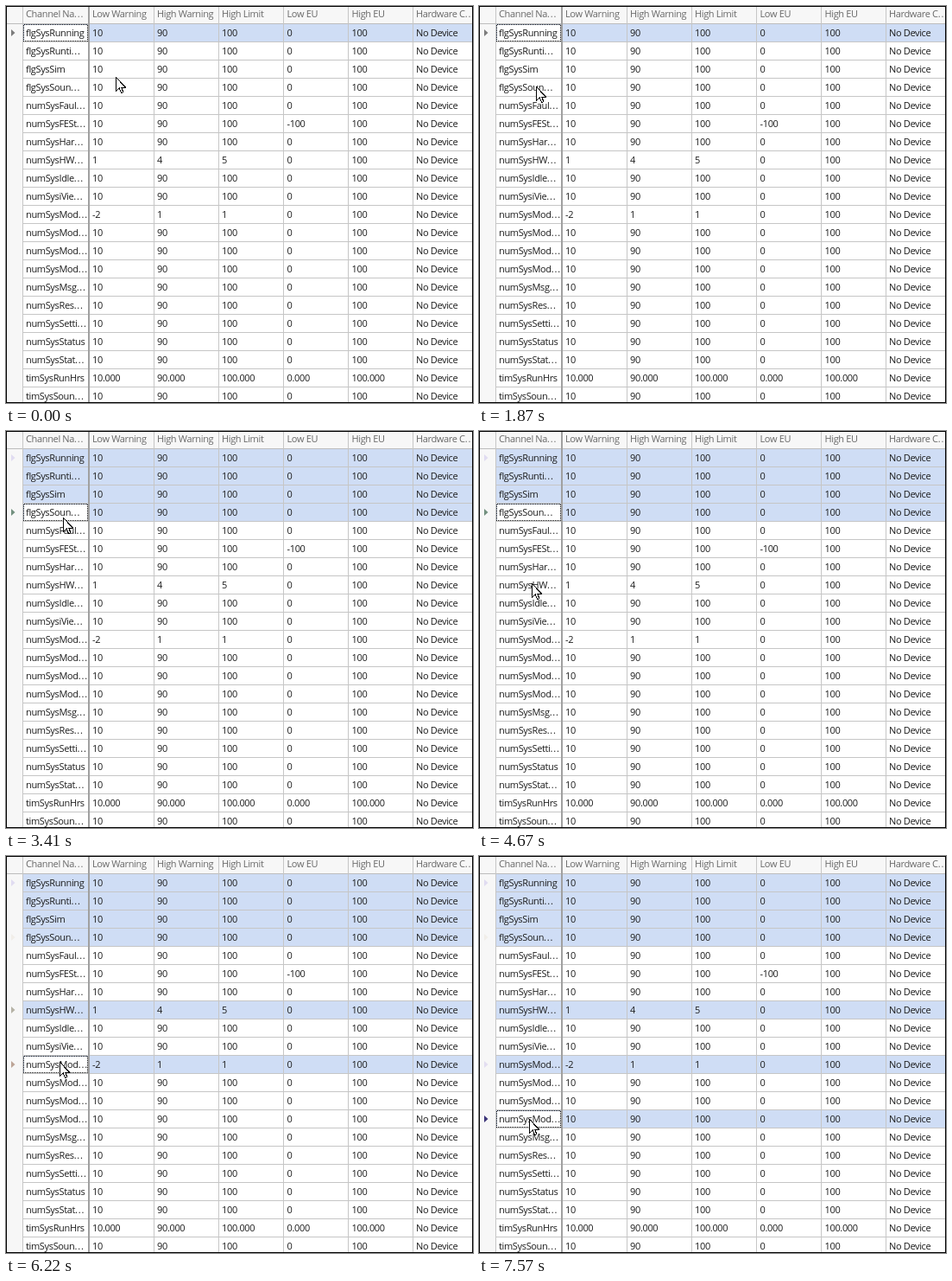
These frames come from a looping animation (541x459 px, 9.31 s). An HTML page:

```html
<!DOCTYPE html>
<html lang="en">
<head>
<meta charset="utf-8">
<title>Channel grid selection</title>
<style>
  html, body { margin: 0; width: 100%; height: 100%; overflow: hidden; background: #fff; }
  svg { position: absolute; left: 0; top: 0; display: block; }
  text { font: 11px "Open Sans", sans-serif; letter-spacing: -.35px; fill: #1c1c1c; white-space: pre; }
  .dots { letter-spacing: .8px; }
  .head { fill: #686868; }
  .grid, #cursor { shape-rendering: crispEdges; }
  .picked { fill: #cfddf5; }
  .focus { fill: #fff; stroke: #000; stroke-dasharray: 1 1; stroke-dashoffset: 1.5; }
  .picked, .focus, .arrow { animation: 9310ms step-end infinite; }

  .pick3 { animation-name: pick3; }
  .pick7 { animation-name: pick7; }
  .pick10 { animation-name: pick10; }
  .pick13 { animation-name: pick13; }
  @keyframes pick3 { 0% { opacity: 0 } 23.2%, 100% { opacity: 1 } }
  @keyframes pick7 { 0% { opacity: 0 } 51.55%, 100% { opacity: 1 } }
  @keyframes pick10 { 0% { opacity: 0 } 65.95%, 100% { opacity: 1 } }
  @keyframes pick13 { 0% { opacity: 0 } 80.55%, 100% { opacity: 1 } }

  .focus { animation-name: focus; }
  @keyframes focus {
    0% { transform: translateY(0) }
    23.2% { transform: translateY(63px) }
    51.55% { transform: translateY(147px) }
    65.95% { transform: translateY(210px) }
    80.55%, 100% { transform: translateY(273px) }
  }

  /* row markers fade in and out in two steps */
  .arrow0 { animation-name: arrow0; }
  .arrow3 { animation-name: arrow3; }
  .arrow7 { animation-name: arrow7; }
  .arrow10 { animation-name: arrow10; }
  .arrow13 { animation-name: arrow13; }
  @keyframes arrow0 { 0% { fill: #7c7c7c } 23.2% { fill: #b9b6c4 } 24.38%, 100% { fill: #e0dcf1 } }
  @keyframes arrow3 {
    0% { fill: transparent } 23.2% { fill: #b4c2ba } 24.38% { fill: #72907f }
    51.55% { fill: #b9c4bd } 52.2%, 100% { fill: #f1eee9 }
  }
  @keyframes arrow7 {
    0% { fill: transparent } 51.55% { fill: #b0ad9d } 52.2% { fill: #67624a }
    65.95% { fill: #b5b2a5 } 67.45%, 100% { fill: transparent }
  }
  @keyframes arrow10 {
    0% { fill: transparent } 65.95% { fill: #bda597 } 67.45% { fill: #84533a }
    80.55% { fill: #c0b0b4 } 81.3%, 100% { fill: #e3def1 }
  }
  @keyframes arrow13 { 0% { fill: transparent } 80.55% { fill: #9691b8 } 81.3%, 100% { fill: #3b3478 } }

  #cursor { animation: cursor 9310ms step-end infinite; }
  @keyframes cursor {
    0% { left: 127px; top: 82px }
    12.88% { left: 127px; top: 82px; animation-timing-function: steps(10, jump-both) }
    20.08% { left: 66px; top: 93px }
    36.62% { left: 66px; top: 93px; animation-timing-function: steps(9, jump-both) }
    43.39% { left: 61px; top: 164px }
    45.64% { left: 61px; top: 164px; animation-timing-function: steps(5, jump-both) }
    50.16% { left: 61px; top: 176px }
    56.49% { left: 61px; top: 176px; animation-timing-function: steps(3, jump-both) }
    58.75% { left: 62px; top: 215px; animation-timing-function: steps(5, jump-end) }
    62.4% { left: 62px; top: 238px }
    70.35% { left: 62px; top: 238px; animation-timing-function: steps(5, jump-both) }
    74% { left: 61px; top: 273px; animation-timing-function: steps(7, jump-end) }
    79.26%, 100% { left: 58px; top: 304px }
  }
</style>
</head>
<body>
<svg id="stage" width="541" height="459" viewBox="0 0 541 459"></svg>
<svg id="cursor" width="12" height="19" viewBox="0 0 12 19">
  <path d="M.5 .5v16l3.7-3.6 2.5 5.6 2.2-1-2.4-5.4h5z" fill="#fff" stroke="#000"/>
</svg>
<script>
  const ROW = 21, TOP = 21;
  const columns = [23, 100, 175, 250, 325.5, 400.5, 475];
  const headers = ['Channel Na...', 'Low Warning', 'High Warning', 'High Limit', 'Low EU', 'High EU', 'Hardware C...'];
  const names = ('flgSysRunning flgSysRunti... flgSysSim flgSysSoun... numSysFaul... numSysFESt... ' +
    'numSysHar... numSysHW... numSysIdle... numSysiVie... numSysMod... numSysMod... numSysMod... ' +
    'numSysMod... numSysMsg... numSysRes... numSysSetti... numSysStatus numSysStat... ' +
    'timSysRunHrs timSysSoun...').split(' ');
  const usual = '10 90 100 0 100';
  const special = {
    5: '10 90 100 -100 100',
    7: '1 4 5 0 100',
    10: '-2 1 1 0 100',
    19: '10.000 90.000 100.000 0.000 100.000'
  };
  const picks = { 0: '', 1: 'pick3', 2: 'pick3', 3: 'pick3', 7: 'pick7', 10: 'pick10', 13: 'pick13' };

  const rowY = row => TOP + row * ROW;
  const rect = (x, y, w, h, fill) => `<rect class="grid" x="${x}" y="${y}" width="${w}" height="${h}" fill="${fill}"/>`;
  const label = text => text.replace('...', '<tspan class="dots">...</tspan>');
  const line = (cells, y, cls = '') =>
    cells.map((cell, i) => `<text class="${cls}" x="${columns[i]}" y="${y}">${label(cell)}</text>`).join('');

  let art = rect(0, 0, 541, 459, '#fff') + rect(1, 1, 539, 19, '#f7f7f7') + rect(1, 20, 18, 438, '#f7f7f7');

  for (const [row, cls] of Object.entries(picks))
    art += `<rect class="grid picked ${cls}" x="20" y="${rowY(row)}" width="520" height="20"/>`;

  art += rect(1, 20, 539, 1, '#bdbdbd');
  names.forEach((_, row) => art += rect(20, rowY(row) + 20, 520, 1, '#c6c6c6'));
  [19, 171, 246, 321, 396, 471].forEach(x => art += rect(x, 1, 1, 457, '#c6c6c6'));
  art += rect(95, 1, 2, 457, '#a0a0a0');
  art += `<rect class="grid focus" x="20.5" y="${TOP + .5}" width="74" height="19"/>`;

  art += line(headers, 13, 'head');
  names.forEach((name, row) => {
    const values = (special[row] || usual).split(' ');
    art += line([name, ...values, 'No Device'], rowY(row) + 14);
  });

  for (const row of [0, 3, 7, 10, 13])
    art += `<path class="arrow arrow${row}" d="M6 ${rowY(row) + 6}v8l4.5-4z"/>`;

  art += '<rect class="grid" x=".5" y=".5" width="540" height="458" fill="none" stroke="#000"/>';
  document.getElementById('stage').innerHTML = art;
</script>
</body>
</html>
```
